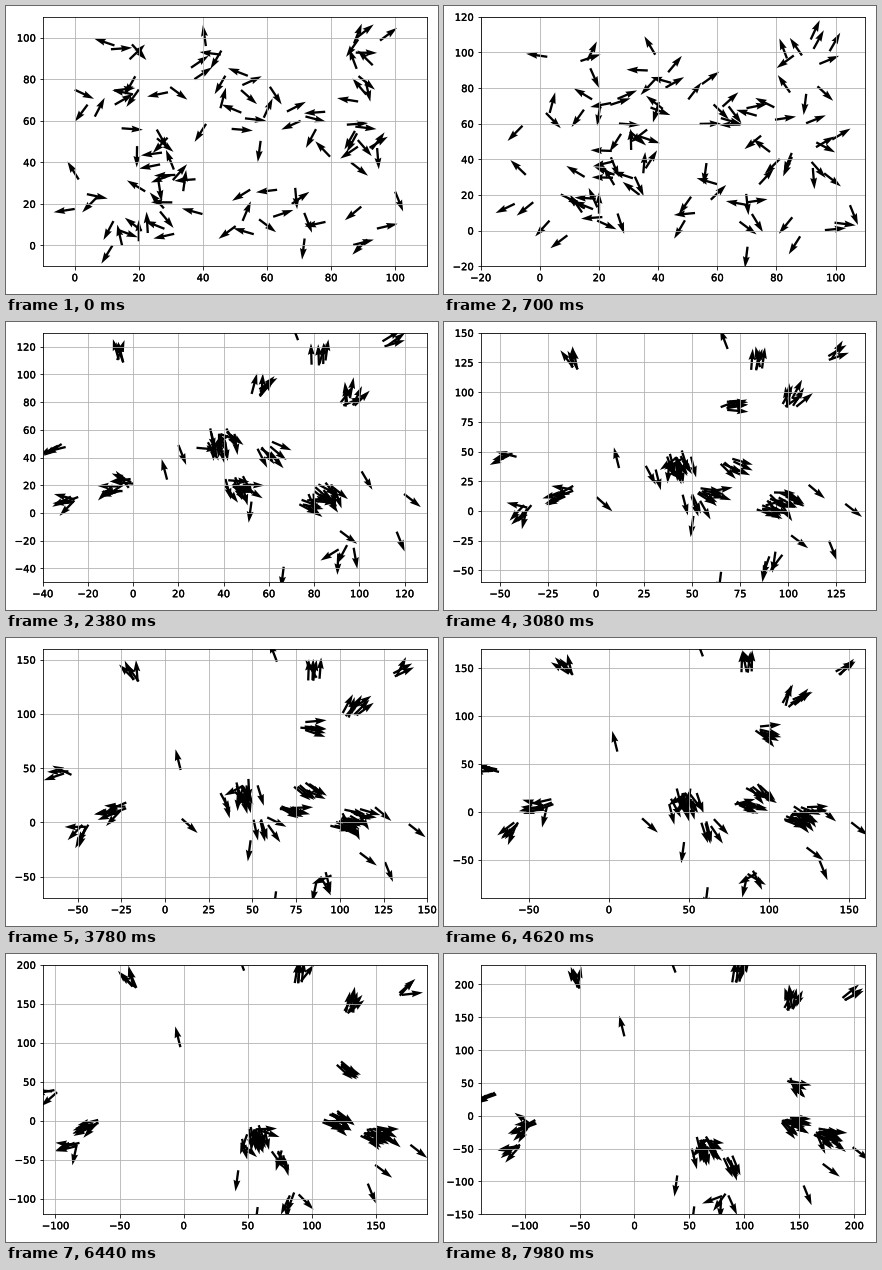
A matplotlib script for the animation above (8 s loop, 432 by 288 pixels).

```python
import numpy as np
import matplotlib.pyplot as plt
from matplotlib.animation import FuncAnimation
from matplotlib.patheffects import withStroke

LOOP, INTERVAL, STEP = 8000, 40, 140
STEPS = np.arange(LOOP // STEP + 1)
MEET, JOIN = 9, 17          # steps at which a flock nears and takes its course
SPEED, FLOCK_SPEED = 2.5, 2.42
GATHER = 14                 # steps until a flock has closed up

rng = np.random.default_rng(11)
flocks = []


def unit(angle):
    return np.stack([np.cos(angle), np.sin(angle)], axis=-1)


def flock(count, home, meet, join, heading, bend=0):
    """Birds from around home pass meet and join, then fly off along heading."""
    alone = count == 1
    early = np.column_stack([np.interp(STEPS[:JOIN + 1], [0, MEET, JOIN], c)
                             for c in zip(home, meet, join)])
    later = np.radians(heading + bend * (STEPS[JOIN + 1:] - JOIN))
    pace = SPEED if alone else FLOCK_SPEED
    track = np.vstack([early, join + pace * np.cumsum(unit(later), axis=0)])

    ahead = track[np.minimum(STEPS + 2, STEPS[-1])]
    dx, dy = (ahead - track[np.maximum(STEPS - 2, 0)]).T
    course = np.arctan2(dy, dx)

    # At first each bird owns about 10 x 10 units of the square
    reach = 0 if alone else 5.6 * np.sqrt(count)
    radius = reach * np.sqrt(rng.random(count))
    start = radius[:, None] * unit(rng.uniform(0, 2 * np.pi, count)) + home
    aim = course[:1] if alone else rng.uniform(-np.pi, np.pi, count)
    spread = 0 if alone else 0.8 + np.sqrt(count)
    flocks.append(dict(
        track=track, course=course, aim=unit(aim),
        scatter=start.clip(0, 100) - home,
        slot=spread * rng.normal(0, 1, (count, 2)).clip(-1.6, 1.6),
        turn=0 if alone else np.radians(rng.normal(0, 27, count)),
        phase=rng.uniform(0, 2 * np.pi, count)))


def loner(x, y, heading):
    """One bird on a straight line through x, y at step MEET."""
    p, v = np.array([x, y]), SPEED * unit(np.radians(heading))
    flock(1, p - MEET * v, p, p + (JOIN - MEET) * v, heading)


# Left side
flock(4, (10, 93), (-3, 94), (-6, 109), 118)
flock(3, (1, 66), (-16, 53), (-32, 48), -171)
flock(5, (5, 22), (-10, 12), (-27, 10), -145)
flock(8, (22, 10), (13, 12), (-4, 21), -160)

# Right side, upwards
flock(5, (88, 90), (85, 92), (81, 106), 84)
flock(3, (93, 92), (95, 114), (113, 122), 35)
flock(7, (82, 62), (82, 68), (95, 79), 61)

# Centre, sinking
flock(15, (32, 68), (38, 70), (40, 56), -76)
flock(5, (28, 42), (40, 46), (45, 23), -66)

# Centre to right
flock(6, (57, 72), (58, 71), (55, 86), 12, bend=-1.6)
flock(6, (46, 84), (38, 83), (58, 47), -33)
flock(7, (36, 22), (36, 26), (46, 20), -18)

# Lower right
flock(6, (59, 18), (66, 13), (77, 8), -21)
flock(4, (72, 20), (74, 29), (82, 16), -25)
flock(8, (85, 42), (85, 28), (84, 17), -26)
flock(4, (90, 10), (95, -7), (94, -26), -97)

# Late leavers
flock(1, (20, 2), (20, 6), (15, 24), 104)
flock(1, (28, 8), (13, 14), (-9, 20), -42)
flock(1, (20, 75), (15, 68), (20, 49), -62)
flock(1, (22, 26), (17, 29), (28, 47), -76)
flock(1, (92, 47), (97, 50), (101, 30), -40)

loner(104, 26, -38)
loner(109, 5, -68)
loner(75.5, -1, -37)
loner(69, -19, -97)
loner(55, 28, -97.7)
loner(80, 106, 110.8)


def flight(f, n):
    """Positions and headings of one flock after n steps."""
    w = 0.5 + 0.5 * np.cos(np.pi * min(n / GATHER, 1))
    drift = f["track"][1] - f["track"][0]
    burst = n * w * w * (SPEED * f["aim"] - drift)
    sway = 0.8 + 0.2 * np.sin(0.25 * n + f["phase"])[:, None]
    pos = f["track"][n] + w * f["scatter"] + burst + (1 - w) * f["slot"] * sway
    angle = f["course"][n] + f["turn"] * np.cos(0.15 * n + f["phase"])
    aim = w * f["aim"] + (1 - w) * unit(angle)
    return pos, aim / np.linalg.norm(aim, axis=1, keepdims=True)


def swarm(n):
    return [np.vstack(p) for p in zip(*(flight(f, n) for f in flocks))]


def fit_view(n):
    """Keep the outermost birds in view; edges move in tens."""
    left, right, bottom, top = (
        round(float(np.interp(n, [0, MEET, JOIN, STEPS[-1]], edge)), -1)
        for edge in ([-10, -28, -44.5, -141.3], [110, 118, 131, 209],
                     [-10, -29, -49, -147], [110, 126, 134, 228]))
    ax.set(xlim=(left, right), ylim=(bottom, top))


fig, ax = plt.subplots(figsize=(6, 4), dpi=72)
ax.grid(True)
pos, aim = swarm(0)
arrows = ax.quiver(*pos.T, *aim.T, scale=18, width=0.006)
fit_view(0)
fig.tight_layout()
heavy = [withStroke(linewidth=0.3, foreground="black")]


def update(i):
    n = int((i + 0.5) * INTERVAL // STEP)
    pos, aim = swarm(n)
    arrows.set_offsets(pos)
    arrows.set_UVC(*aim.T)
    fit_view(n)
    for label in ax.get_xticklabels() + ax.get_yticklabels():
        label.set_path_effects(heavy)
    return [arrows]


anim = FuncAnimation(fig, update, frames=LOOP // INTERVAL, interval=INTERVAL,
                     init_func=lambda: [arrows], repeat=True, repeat_delay=0)
plt.show()
```
